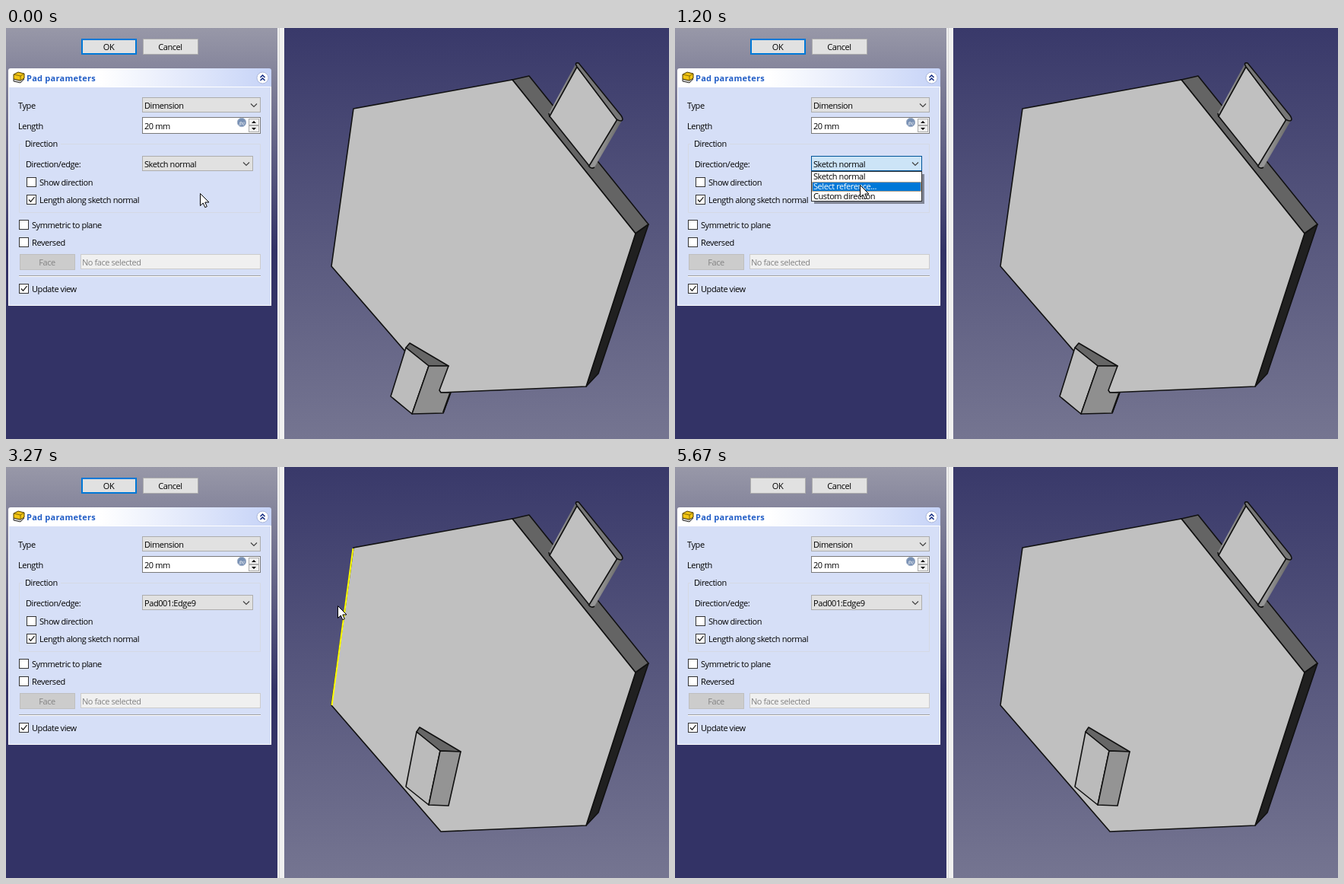
Recreate the animation shown at these times as an HTML page. Size 872 by 540 pixels, loop 5.79 s.

```html
<!DOCTYPE html>
<html lang="en">
<head>
<meta charset="utf-8">
<title>Pad parameters</title>
<style>
  html, body { margin: 0; width: 100%; height: 100%; overflow: hidden; }
  svg { display: block; width: 872px; height: 540px; }
  text { font: 11px "Open Sans", "Noto Sans", sans-serif; letter-spacing: -.42px; white-space: pre; }
  .title { font-weight: bold; letter-spacing: .25px; }
  .middle { text-anchor: middle; }
  .solid { stroke: #111; stroke-width: 1.6; stroke-linejoin: round; }
</style>
</head>
<body>
<svg id="stage" viewBox="0 0 872 540"></svg>
<script>
const LOOP = 5790, STEP = 66.25, STEPS = 9;

const rect = (x, y, w, h, fill, stroke = 'none', extra = '') =>
  `<rect x="${x + .5}" y="${y + .5}" width="${w - 1}" height="${h - 1}" fill="${fill}" stroke="${stroke}" ${extra}/>`;
const fillRect = (x, y, w, h, fill, extra = '') =>
  `<rect x="${x}" y="${y}" width="${w}" height="${h}" fill="${fill}" ${extra}/>`;
const text = (x, y, label, fill = '#000', extra = '') =>
  `<text x="${x}" y="${y}" fill="${fill}" ${extra}>${label}</text>`;
const line = (d, stroke = '#444', width = 1.2) =>
  `<path d="${d}" fill="none" stroke="${stroke}" stroke-width="${width}"/>`;
const face = (points, fill) => `<polygon class="solid" points="${points}" fill="${fill}"/>`;
const group = (id, content) => `<g id="${id}">${content}</g>`;
const gradient = (id, dir, ...stops) =>
  `<linearGradient id="${id}" x1="0" y1="0" ${dir}>` +
  stops.map(([at, color]) => `<stop offset="${at}" stop-color="${color}"/>`).join('') + '</linearGradient>';

const button = (x, label, id) =>
  rect(x, 14, 73, 21, '#e1e1e1', '#adadad', `id="${id}"`) +
  text(x + 36, 29, label, '#000', 'class="middle"');
const checkbox = (x, y, label, checked) =>
  rect(x, y, 13, 13, '#fff', '#333') +
  (checked ? line(`M${x + 3} ${y + 6.5}l2.5 2.7 5-6`, '#222', 1.3) : '') +
  text(x + 17, y + 11, label);
const combo = (x, y, w, label, id) =>
  rect(x, y, w, 20, '#e1e1e1', '#adadad', `id="${id}Box"`) +
  text(x + 3, y + 15, label, '#000', `id="${id}Text"`) +
  line(`M${x + w - 13} ${y + 8.5}l4 4 4-4`);

const choices = ['Sketch normal', 'Select reference...', 'Custom direction'];
const row = (label, i) =>
  rect(180, 189 + 13 * i, 144, 13, 'none', 'none', `class="row" stroke-dasharray="1 1"`) +
  text(182, 199 + 13 * i, label, '#000', 'class="choice"');

const padIcon =
  '<path d="M10 67l5-3 9 3-5 5-9-2z" fill="#c9c9c9" stroke="#333"/>' +
  '<path d="M10 61l6-3 8 2v6l-5 3-9-2z" fill="#f2c515" stroke="#4a3a00"/>' +
  '<path d="M10 61l9 2 5-3M19 63v6" fill="none" stroke="#6b5500" stroke-width=".8"/>';

const spinBox =
  rect(179, 117, 156, 22, '#fff', '#7a7a7a') + text(182, 133, '20 mm') +
  '<circle cx="310" cy="124" r="5.7" fill="#7890b4" stroke="#a5b4cb"/>' +
  text(310, 126.5, 'f(x)', '#fff', 'class="middle" style="font-size:6px;font-style:italic"') +
  rect(319, 119, 14, 9, '#f0f0f0', '#adadad') + rect(319, 128, 14, 9, '#f0f0f0', '#adadad') +
  '<path d="M323 125h6l-3-3zM323 131h6l-3 3z"/>';

const panel =
  fillRect(0, 0, 357, 540, 'url(#dock)') + fillRect(357, 0, 9, 540, '#f0f0f0') +
  fillRect(359, 0, 1, 540, '#d4d4d4') +
  button(99, 'OK', 'ok') + button(180, 'Cancel', 'cancel') +
  '<path d="M3 78V56q0-3 3-3H346q3 0 3 3V78z" fill="url(#header)"/>' +
  rect(3, 77, 346, 288, '#d6dff7', '#fff') + padIcon +
  text(27, 70, 'Pad parameters', '#215dc6', 'class="title"') +
  '<circle cx="337.5" cy="65.500" r="7.500" fill="#fff" stroke="#aab6d8"/>' +
  line('M334.500 65l3-3 3 3M334.500 69l3-3 3 3', '#102a80', 1.5) +
  text(16, 106, 'Type') + combo(179, 91, 156, 'Dimension', 'type') +
  text(16, 133, 'Length') + spinBox +
  line('M21 152.500H17.500V242.500H334.500V152.500H72', '#d5d9e4', 1) + text(25, 156, 'Direction') +
  text(26, 183, 'Direction/edge:') + combo(179, 168, 146, choices[0], 'direction') +
  checkbox(27, 196, 'Show direction') + checkbox(27, 219, 'Length along sketch normal', true) +
  checkbox(17, 252, 'Symmetric to plane') + checkbox(17, 275, 'Reversed') +
  rect(18, 297, 73, 21, '#ccc', '#bfbfbf') + text(54, 312, 'Face', '#838383', 'class="middle"') +
  rect(98, 297, 237, 20, '#f0f0f0', '#ccc') + text(100, 312, 'No face selected', '#838383') +
  fillRect(17, 325, 318, 1, '#a0a0a0') + fillRect(17, 326, 318, 1, '#fff') +
  checkbox(17, 336, 'Update view', true);

const rod =
  '<path d="M750 46L714 112 715 117 752 51z" fill="url(#rodSide)"/>' +
  '<path d="M804 118L811 120 774 183Q771 187 766 181z" fill="url(#rodSide)"/>' +
  face('751,51 804,120 767,181 715,116', '#c0c0c0') +
  '<path class="solid" d="M751 51Q747 45 753 46L809 115Q813 121 809 122 806 122 803 120z" fill="#777"/>' +
  line('M714 112L715 117M766 181Q770 186 774 183', '#111', 1.6);

const view =
  fillRect(366, 0, 506, 540, 'url(#sky)') +
  face('666,68 688,63 845,258 828,270', '#646464') +
  face('845,258 779,454 763,471 828,270', '#202020') +
  face('457,106 666,68 828,270 763,471 572,479 428,313', '#c0c0c0') + rod +
  group('normalPad',
    face('526,420 531,414 582,444 556,444', '#666') +
    face('526,420 556,444 534,507 506,484', '#bcbcbc') +
    face('556,444 582,444 570,476 572,479 585,479 575,506 534,507', '#8f8f8f') +
    line('M584 480L575 505', '#111', 2.2)) +
  group('edgePad',
    face('540,348 544,342 598,374 571,373', '#666') +
    face('540,348 571,373 556,444 526,420', '#bbb') +
    face('571,373 598,374 582,445 556,444', '#949494')) +
  group('edge', line('M456.500 107L428.500 313', '#ff0', 2));

document.getElementById('stage').innerHTML =
  '<defs>' +
  gradient('dock', 'x2="0" y2="1"', [0, '#9898a8'], [.54, '#333366']) +
  gradient('header', 'x2="1" y2="0"', [0, '#fff'], [.35, '#fff'], [1, '#c6d3f7']) +
  gradient('sky', 'x2="0" y2="1"', [0, '#39396a'], [1, '#757591']) +
  gradient('rodSide', 'x2="1" y2=".5"', [0, '#555'], [.5, '#999'], [1, '#444']) +
  '</defs>' + view + panel +
  group('list',
    fillRect(183, 192, 145, 39, '#000', 'opacity=".4"') +
    rect(179, 188, 146, 40, '#fff', '#333') + choices.map(row).join('')) +
  group('cursor', '<path d="M.5.5V16.500L4.300 13 6.800 18.700 9.300 17.600 6.800 12H12z" fill="#fff" stroke="#000"/>');

const $ = id => document.getElementById(id);
const rows = document.querySelectorAll('.row'), labels = document.querySelectorAll('.choice');
const show = (id, on) => $(id).setAttribute('display', on ? 'inline' : 'none');
const paint = (el, attrs) => { for (const key in attrs) el.setAttribute(key, attrs[key]); };
const ease = p => p < .5 ? 4 * p ** 3 : 1 - 4 * (1 - p) ** 3;

// Stepped moves: start time and the two end points
const moves = [
  [70, [255, 217], [248, 184]],
  [670, [248, 184], [243, 206]],
  [2070, [245, 206], [444, 187]],
  [4000, [436, 182], [170, 279]],
];

function pointer(t) {
  if (t >= 4800) return [86, 149];
  if (t >= 4730) return [128, 214];
  if (t >= 3130 && t < 4000) return [436, 182];
  const [start, from, to] = moves.filter(m => t >= m[0]).pop() || moves[0];
  const done = t < start ? 0 : Math.min(STEPS, Math.floor((t - start + 1) / STEP) + 1);
  const p = ease(done / STEPS);
  return from.map((v, i) => Math.round(v + (to[i] - v) * p));
}

function comboColors(t) {
  if (t >= 467 && t < 800) return { fill: '#e5f1fb', stroke: '#0078d7' };
  if (t >= 800 && t < 2136) return { fill: '#cce4f7', stroke: '#005499' };
  return { fill: '#e1e1e1', stroke: '#adadad' };
}

function draw(t) {
  const [x, y] = pointer(t);
  $('cursor').setAttribute('transform', `translate(${x} ${y})`);
  show('cursor', t < 4870);
  show('list', t >= 670 && t < 2070);
  show('normalPad', t < 2070);
  show('edgePad', t >= 3270);
  show('edge', t >= 2533 && t < 4066);
  paint($('directionBox'), comboColors(t));
  $('directionText').textContent = t < 2070 ? choices[0] : t < 3270 ? choices[1] : 'Pad001:Edge9';

  const active = y < 202 ? 0 : 1;
  rows.forEach((el, i) => paint(el, i === active
    ? { fill: '#0078d7', stroke: '#e58a30' } : { fill: 'none', stroke: 'none' }));
  labels.forEach((el, i) => paint(el, { fill: i === active ? '#fff' : '#000' }));

  const focused = t < 5670;
  paint($('ok'), focused
    ? { x: 100, y: 15, width: 71, height: 19, stroke: '#0078d7', 'stroke-width': 2 }
    : { x: 99.5, y: 14.5, width: 72, height: 20, stroke: '#adadad', 'stroke-width': 1 });
}

const begin = performance.now();
function tick() {
  draw((performance.now() - begin) % LOOP);
  requestAnimationFrame(tick);
}
tick();
</script>
</body>
</html>
```
